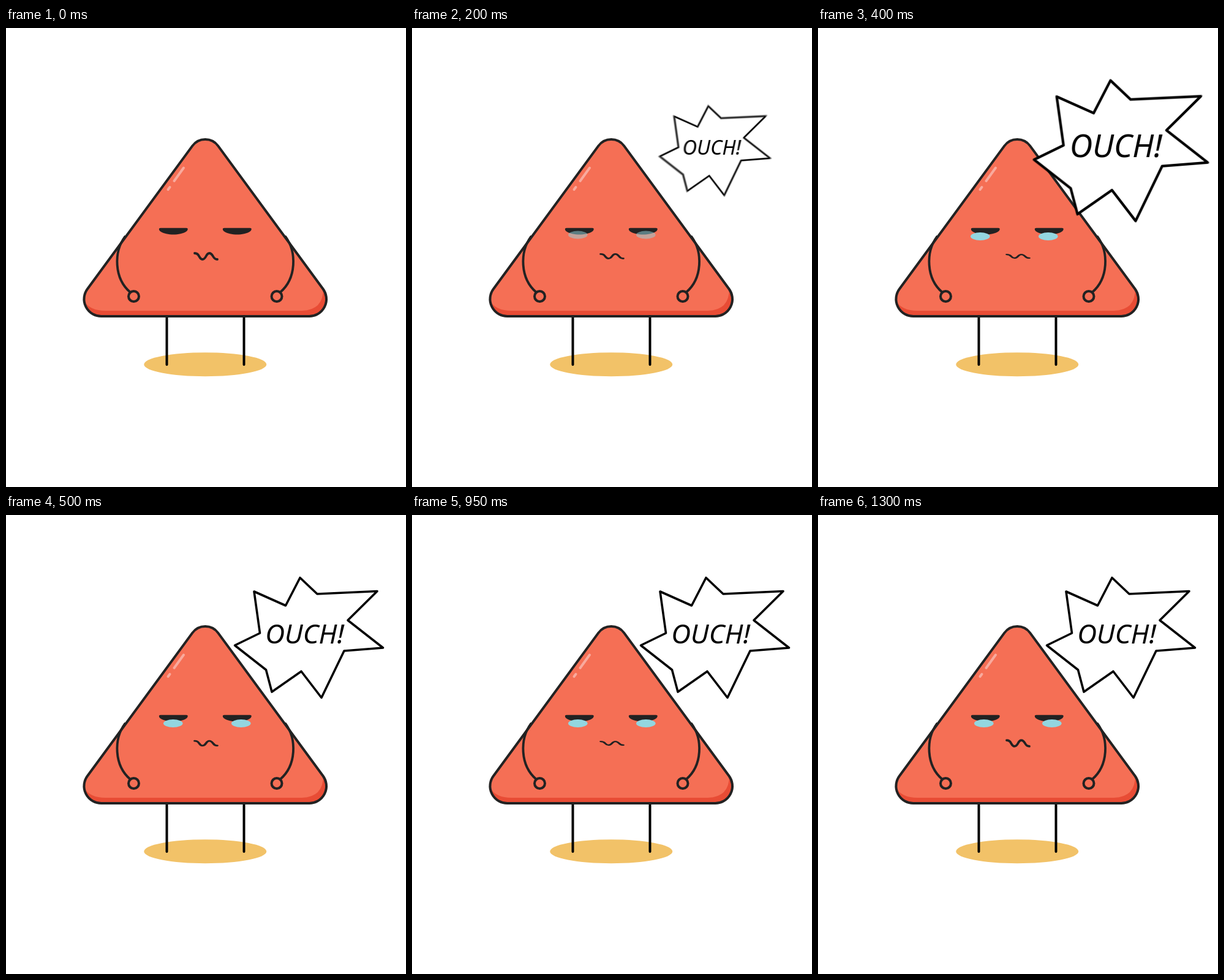
An HTML page with a canvas for the animation above (1350 ms loop, 653 px wide and 750 px high).

```html
<!DOCTYPE html>
<html lang="en">
<head>
<meta charset="utf-8">
<title>Ouch</title>
<style>
  html, body { margin: 0; width: 100%; height: 100%; overflow: hidden; background: #fff; }
  canvas { display: block; }
</style>
</head>
<body>
<canvas id="stage" width="653" height="750" aria-label="A tired triangle says OUCH!"></canvas>
<script>
const LOOP = 1350, STEP = 50;
const DARK = '#222', RED = '#f56f55', DEEP_RED = '#e84c35';
const AXIS = 325.25;

const stage = document.getElementById('stage');
const ctx = stage.getContext('2d');
const inkLayer = document.createElement('canvas');
inkLayer.width = stage.width;
inkLayer.height = stage.height;
const ink = inkLayer.getContext('2d');

// Straight or sine-eased interpolation through [time, value] keys
const linear = u => u;
const sine = u => (1 - Math.cos(Math.PI * u)) / 2;
function track(keys, t, ease) {
  if (t <= keys[0][0]) return keys[0][1];
  for (let i = 1; i < keys.length; i++) {
    const [t0, v0] = keys[i - 1], [t1, v1] = keys[i];
    if (t <= t1) return v0 + (v1 - v0) * ease((t - t0) / (t1 - t0));
  }
  return keys[keys.length - 1][1];
}

const POP = [[0, 0], [200, 0.76], [300, 0.976], [400, 1.18], [500, 1]];
const TEAR_SHIFT = [[300, 0], [400, -6], [560, 5.5], [760, 0]];
const TEAR_FADE = [[80, 0], [200, 0.5], [320, 1]];

function stroke(path, width, color = DARK) {
  ctx.lineWidth = width;
  ctx.strokeStyle = color;
  ctx.stroke(path);
}

function fill(path, color) {
  ctx.fillStyle = color;
  ctx.fill(path);
}

function ellipse(x, y, rx, ry, color) {
  const path = new Path2D();
  path.ellipse(x, y, rx, ry, 0, 0, Math.PI * 2);
  fill(path, color);
}

function triangle() {
  const path = new Path2D();
  path.moveTo(AXIS, 471);
  path.arcTo(100.2, 471, AXIS, 164, 28);
  path.arcTo(AXIS, 164, 550.3, 471, 26);
  path.arcTo(550.3, 471, AXIS, 471, 28);
  path.closePath();
  return path;
}

const body = triangle();
const bodyLight = new Path2D('M120 445 L128 447 Q138 462 162 462 H483 Q518 461 518 426 V170 H120 Z');
const shine = new Path2D('M290 228.5 L274.5 250 M267.5 260 L264.5 264');
const legs = new Path2D('M262.5 470 V550 M388.5 470 V550');
const eye = new Path2D('M-21 -5.2 H21 C24.5 -5.2 24 -1.5 21 0.5 C11 7.2 -11 7.2 -21 0.5 C-24 -1.5 -24.5 -5.2 -21 -5.2 Z');
const mouth = new Path2D('M308 -5 Q313 -5 315.2 0 Q318 5 320.5 5 Q324 5 326.5 0 Q329 -5 332 -5 Q335 -5 338 0 Q340.5 5 345 5');
const arm = new Path2D('M194 341 C176 366 176 409 203 432');
const hand = new Path2D();
hand.arc(208.5, 438.5, 8.5, 0, Math.PI * 2);

// Coordinates relative to the bubble's centre
const BUBBLE = { x: 494.5, y: 200.5 };
const burst = new Path2D(
  'M-14.5 -98 L13.5 -71.5 L111.5 -76 L63.5 -28.5 L121 16.5 L57.5 21.5 L20.5 98 ' +
  'L-12.5 55 L-60.5 88.5 L-70 52.5 L-121 12.5 L-80 -7.5 L-89.5 -75.5 L-38 -52.5 Z');

function drawArm() {
  stroke(arm, 3.8);
  fill(hand, RED);
  stroke(hand, 4);
}

function drawBody() {
  ellipse(AXIS, 549.7, 100, 19.5, '#f2c268');
  stroke(legs, 4, '#000');
  fill(body, DEEP_RED);
  ctx.save();
  ctx.clip(body);
  fill(bodyLight, RED);
  ctx.restore();
  stroke(body, 4);
  stroke(shine, 4, '#f9aa9d');

  drawArm();
  ctx.save();
  ctx.translate(2 * AXIS, 0);
  ctx.scale(-1, 1);
  drawArm();
  ctx.restore();
}

function drawFace(t) {
  for (const x of [273.3, 377.3]) {
    ctx.save();
    ctx.translate(x, 332);
    fill(eye, DARK);
    ctx.restore();
  }

  ctx.save();
  ctx.translate(0, 373);
  ctx.scale(1, 0.78 + 0.22 * Math.cos(4 * Math.PI * t / LOOP));
  stroke(mouth, 3.8);
  ctx.restore();

  const fade = track(TEAR_FADE, t, linear);
  const x = 270.8 + track(TEAR_SHIFT, t, sine);
  const y = 338 + 2.5 * track([[200, 0], [350, 1]], t, linear);
  ctx.globalAlpha = fade;
  ellipse(x, y, 15.8, 6.5, '#93d6e0');
  ellipse(x + 111, y, 15.8, 6.5, '#93d6e0');
  ctx.globalAlpha = 1;
}

function place(context, scale) {
  context.translate(BUBBLE.x, BUBBLE.y);
  context.scale(scale, scale);
}

function drawBubble(t) {
  const scale = track(POP, t, linear);
  if (!scale) return;
  ctx.save();
  place(ctx, scale);
  fill(burst, '#fff');
  ctx.restore();

  // Motion blur: add up the ink over a short shutter time
  const samples = t < 500 ? 8 : 1;
  ink.clearRect(0, 0, inkLayer.width, inkLayer.height);
  ink.globalCompositeOperation = 'lighter';
  ink.globalAlpha = 1 / samples;
  ink.lineJoin = 'round';
  ink.lineWidth = 3.6;
  ink.textAlign = 'center';
  ink.font = 'italic 500 44px "Noto Sans", sans-serif';
  for (let i = 0; i < samples; i++) {
    ink.save();
    place(ink, track(POP, t - 10 * i / samples, linear));
    ink.stroke(burst);
    ink.fillText('OUCH!', -7, 9);
    ink.restore();
  }
  ctx.drawImage(inkLayer, 0, 0);
}

function draw(now) {
  const t = Math.floor(now % LOOP / STEP) * STEP;
  ctx.fillStyle = '#fff';
  ctx.fillRect(0, 0, stage.width, stage.height);
  ctx.lineCap = ctx.lineJoin = 'round';
  drawBody();
  drawFace(t);
  drawBubble(t);
}

let start;
function tick(now) {
  start ??= now;
  draw(now - start);
  requestAnimationFrame(tick);
}
draw(0);
requestAnimationFrame(tick);
</script>
</body>
</html>
```
